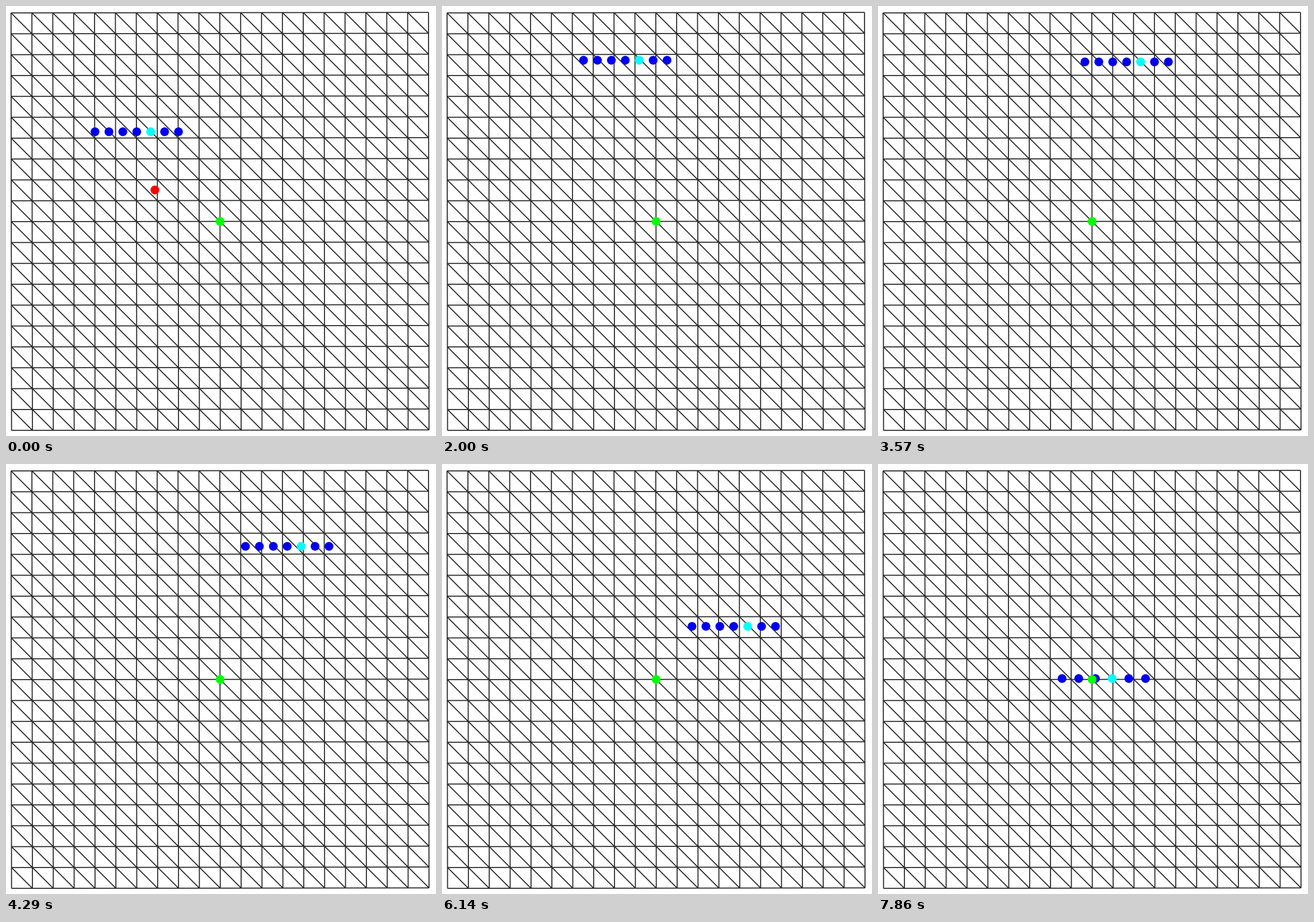
Animation of 748 by 748 pixels, one loop 8 s. Source, as a matplotlib script:

```python
import numpy as np
import matplotlib.pyplot as plt
from matplotlib.animation import FuncAnimation
from matplotlib.collections import LineCollection
from matplotlib.patches import Circle

SIZE, DPI = 748, 100
FRAMES, LOOP_MS = 56, 8000
PX = 72 / DPI

CELLS, STEP = 20, 36.31
HALF = CELLS * STEP / 2
CENTER = np.array([372.3, 374.7])
TILT = 0.0012
HOME = np.array([372.5, 374.8])
DOT_R = 7.6

# The row of dots rides on a circle that passes through the home point.
ORBIT = np.array([372.3, 229.4])
ORBIT_R = 4 * STEP
ROW = 4 * STEP
KEY_FRAMES = [0, 8, 14, 16, 20, 24, 30, 32, 38, 40, 48, 55]
KEY_ANGLES = [175.8, 141.8, 111.6, 105.4, 84.0, 65.5,
              36.4, 28.8, -2.2, -12.3, -48.8, -81.9]
LOSS_FRAME = 52

SHOT_START = np.array([259.0, 320.0])
SHOT_FRAMES = 5

fig = plt.figure(figsize=(SIZE / DPI, SIZE / DPI), dpi=DPI, facecolor="white")
ax = fig.add_axes([0, 0, 1, 1])
ax.set_xlim(0, SIZE)
ax.set_ylim(SIZE, 0)
ax.axis("off")


def draw_mesh():
    t = np.linspace(-HALF, HALF, CELLS + 1)
    lines = [[(x, -HALF), (x, HALF)] for x in t]
    lines += [[(-HALF, y), (HALF, y)] for y in t]
    for k in range(CELLS):
        lines.append([(t[k], -HALF), (HALF, t[CELLS - k])])
        if k:
            lines.append([(-HALF, t[k]), (t[CELLS - k], HALF)])
    # A very slight counter-clockwise turn of the whole mesh.
    turn = np.array([[1, -TILT], [TILT, 1]])
    lines = CENTER + np.array(lines) @ turn
    mesh = LineCollection(lines, colors="#262626", linewidths=1.75 * PX,
                          zorder=1)
    mesh.set_snap(False)
    ax.add_collection(mesh)


def add_dot(color, z, pos=(0, 0)):
    return ax.add_patch(Circle(pos, DOT_R, facecolor=color,
                               edgecolor="none", zorder=z))


draw_mesh()
row = [add_dot("#0000f0", 3) for _ in range(7)]
shot = add_dot("#ff0000", 4)
home = add_dot("#00ff00", 5, HOME)


def update(i):
    a = np.radians(np.interp(i, KEY_FRAMES, KEY_ANGLES))
    cx, cy = ORBIT + ORBIT_R * np.array([np.cos(a), -np.sin(a)])
    count = 7 if i < LOSS_FRAME else 6
    xs = cx + np.linspace(-ROW / 2, ROW / 2, count)
    for k, dot in enumerate(row):
        dot.set_visible(k < count)
        if k < count:
            dot.center = xs[k], cy
            dot.set_facecolor("#00ffff" if k == count - 3 else "#0000f0")

    shot.set_visible(i < SHOT_FRAMES)
    u = min(i / SHOT_FRAMES, 1)
    shot.center = tuple(SHOT_START + u * (HOME - SHOT_START))
    return [*row, shot, home]


anim = FuncAnimation(fig, update, frames=FRAMES, interval=LOOP_MS / FRAMES,
                     repeat=True, repeat_delay=0, blit=False)
plt.show()
```
